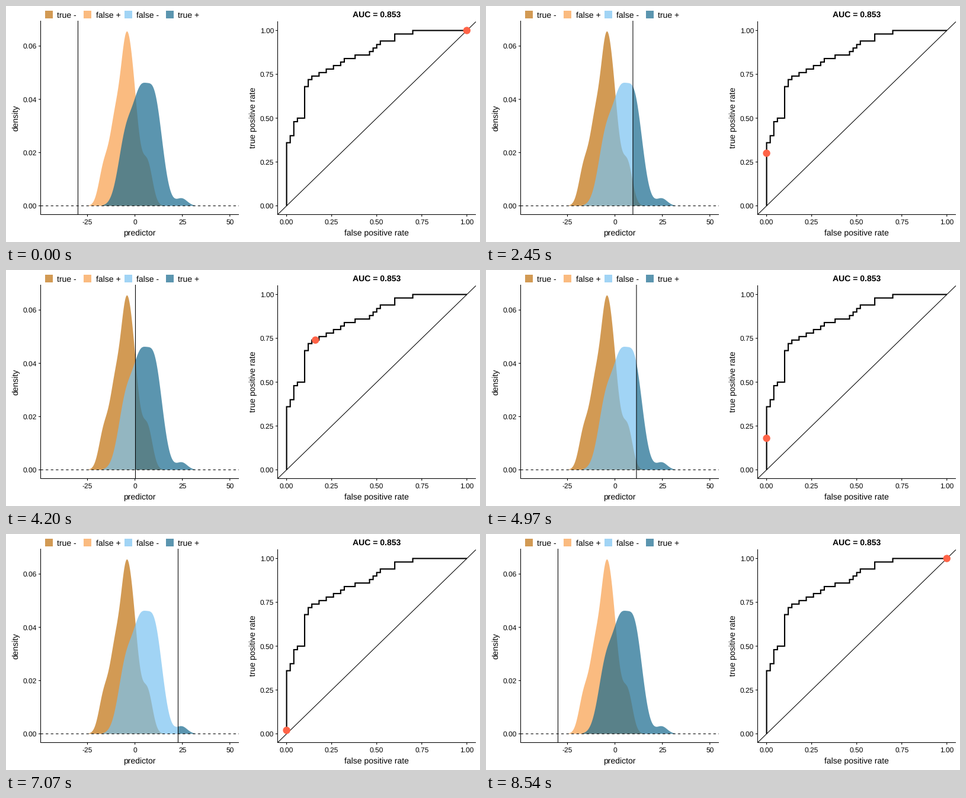
A matplotlib script that plays this animation: 800 by 400 pixels, repeating every 9170 ms.

```python
import numpy as np
import matplotlib.pyplot as plt
from matplotlib.animation import FuncAnimation
from matplotlib.patches import Circle, Polygon, Rectangle

W, H, DPI = 800, 400, 100
FRAMES, STEP = 131, 70
PX = 72 / DPI  # points per pixel
ALPHA = 0.7
CASES = 50  # per class

plt.rcParams.update({
    "font.family": "Liberation Sans",
    "text.hinting": "none",
    "path.snap": False,
})


def tint(*rgb):
    """Colour that shows as rgb when laid over white at ALPHA."""
    c = (np.array(rgb) / 255 - (1 - ALPHA)) / ALPHA
    return (*np.clip(c, 0, 1), ALPHA)


TRUE_NEG, FALSE_POS = tint(211, 155, 84), tint(251, 187, 128)
FALSE_NEG, TRUE_POS = tint(161, 212, 245), tint(91, 150, 176)


# data to stage pixels
def pred_x(v):
    return 217.6 + 3.204 * np.asarray(v)


def dens_y(v):
    return 338.7 - 4513 * np.asarray(v)


def roc_x(v):
    return 473.6 + 304.2 * np.asarray(v)


def roc_y(v):
    return 338.7 - 297.2 * np.asarray(v)


def through(points):
    """Straight pieces through a few (x, y) key points."""
    xs, ys = zip(*points)
    return lambda x: np.interp(x, xs, ys)


def mixture(*parts):
    """Sum of normal curves given as (weight, mean, sd)."""
    def density(x):
        return sum(w / (s * np.sqrt(2 * np.pi)) * np.exp(-((x - m) / s) ** 2 / 2)
                   for w, m, s in parts)
    return density


negatives = mixture((.085, -16.5, 2.6), (.203, -10.6, 3), (.073, -5.4, 2.3),
                    (.545, -2.8, 3.95), (.094, 6.8, 2.6))
positives = mixture((.278, -4.4, 4.1), (.271, 2.7, 3.6),
                    (.431, 10.1, 4.3), (.02, 24.7, 2.9))

# threshold by frame
threshold = through([(1, -30), (16, -3.9), (26, 15.2), (48, 1.2), (57, -2.75),
                     (71, 11.35), (100.5, 24), (122, -30)])

# cases called positive, by threshold
called = through([(-12, 100), (-3.9, 65), (1.2, 40), (9.5, 15),
                  (11.35, 9), (17, 1)])

# true positives by false positives; whole cases only
hits = through([(0, 18), (1, 20), (2, 24.2), (4, 25.9), (5, 34.9), (7, 37.1),
                (16, 42.1), (22, 43.95), (26, 47.1), (29, 47.9), (30, 49),
                (35, 50)])


def staircase():
    """ROC curve walked one case at a time."""
    y, pts = 0, [(0, 0)]
    for x in range(CASES):
        level = int(hits(x))
        pts += [(x, v) for v in range(y + 1, level + 1)]
        pts.append((x + 1, level))
        y = level
    return np.array(pts) / CASES


ROC = staircase()

fig = plt.figure(figsize=(W / DPI, H / DPI), dpi=DPI, facecolor="white")
ax = fig.add_axes([0, 0, 1, 1])
ax.set_xlim(0, W)
ax.set_ylim(H, 0)
ax.axis("off")


def line(xs, ys, width=1.07, z=3, **kw):
    kw.setdefault("solid_capstyle", "butt")
    return ax.plot(xs, ys, color="black", lw=width * PX, zorder=z, **kw)[0]


def label(x, y, s, size=14, ha="center", **kw):
    ax.text(x, y, s, fontsize=size * PX, ha=ha, va="baseline",
            rotation_mode="anchor", color="black", **kw)


def panel(left, right, top, xticks, yticks, xname, yname, name_x):
    line([left, left, right], [top, 353.5, 353.5])
    for x, s in xticks:
        line([x, x], [353.5, 357])
        label(x, 369.4, s, 12)
    for y, s in yticks:
        line([left - 3.5, left], [y, y])
        label(left - 6.5, y + 4.3, s, 12, "right")
    label((left + right) / 2, 388.7, xname)
    label(name_x, 189.7, yname, rotation=90)


quarters = np.linspace(0, 1, 5)
panel(58.5, 393, 25,
      [(pred_x(v), str(v)) for v in range(-25, 51, 25)],
      [(dens_y(v), f"{v:.2f}") for v in np.arange(4) * .02],
      "predictor", "density", 21)
panel(458.5, 793, 26,
      [(roc_x(v), f"{v:.2f}") for v in quarters],
      [(roc_y(v), f"{v:.2f}") for v in quarters],
      "false positive rate", "true positive rate", 421.5)
label(625.5, 19, "AUC = 0.853", weight="bold")

for x, s, color in [(66, "true -", TRUE_NEG), (131, "false +", FALSE_POS),
                    (200, "false -", FALSE_NEG), (270, "true +", TRUE_POS)]:
    ax.add_patch(Rectangle((x, 8), 13, 13, fc=color, lw=0))
    label(x + 20.5, 20, s, ha="left")

line([58.5, 393], [338.7, 338.7], z=4, dashes=(4, 4), dash_capstyle="butt")
line(roc_x([-.05, 1.05]), roc_y([-.05, 1.05]))
line(roc_x(ROC[:, 0]), roc_y(ROC[:, 1]), 2.13, solid_joinstyle="miter")


def region(color, z):
    return ax.add_patch(Polygon([(0, 0)] * 3, fc=color, lw=0, zorder=z))


areas = [(negatives, -24.5, 15, region(TRUE_NEG, 1), region(FALSE_POS, 1)),
         (positives, -17, 32, region(FALSE_NEG, 2), region(TRUE_POS, 2))]
cut_line = line([0, 0], [25, 353.5], z=5)
dot = ax.add_patch(Circle((0, 0), 6.2, fc="tomato", lw=0, zorder=6))


def fill(patch, density, lo, hi):
    x = np.linspace(lo, hi, 200)
    xs = np.concatenate([[lo], x, [hi]])
    ys = np.concatenate([[0], density(x), [0]])
    patch.set_xy(np.column_stack([pred_x(xs), dens_y(ys)]))


def update(i):
    cut = threshold(i)
    for density, lo, hi, below, above in areas:
        split = np.clip(cut, lo, hi)
        fill(below, density, lo, split)
        fill(above, density, split, hi)
    cut_line.set_xdata([pred_x(cut)] * 2)
    fpr, tpr = ROC[int(round(called(cut)))]
    dot.center = roc_x(fpr), roc_y(tpr)
    return []


anim = FuncAnimation(fig, update, frames=FRAMES, interval=STEP,
                     init_func=lambda: update(0), repeat=True,
                     repeat_delay=0, blit=False)
plt.show()
```
